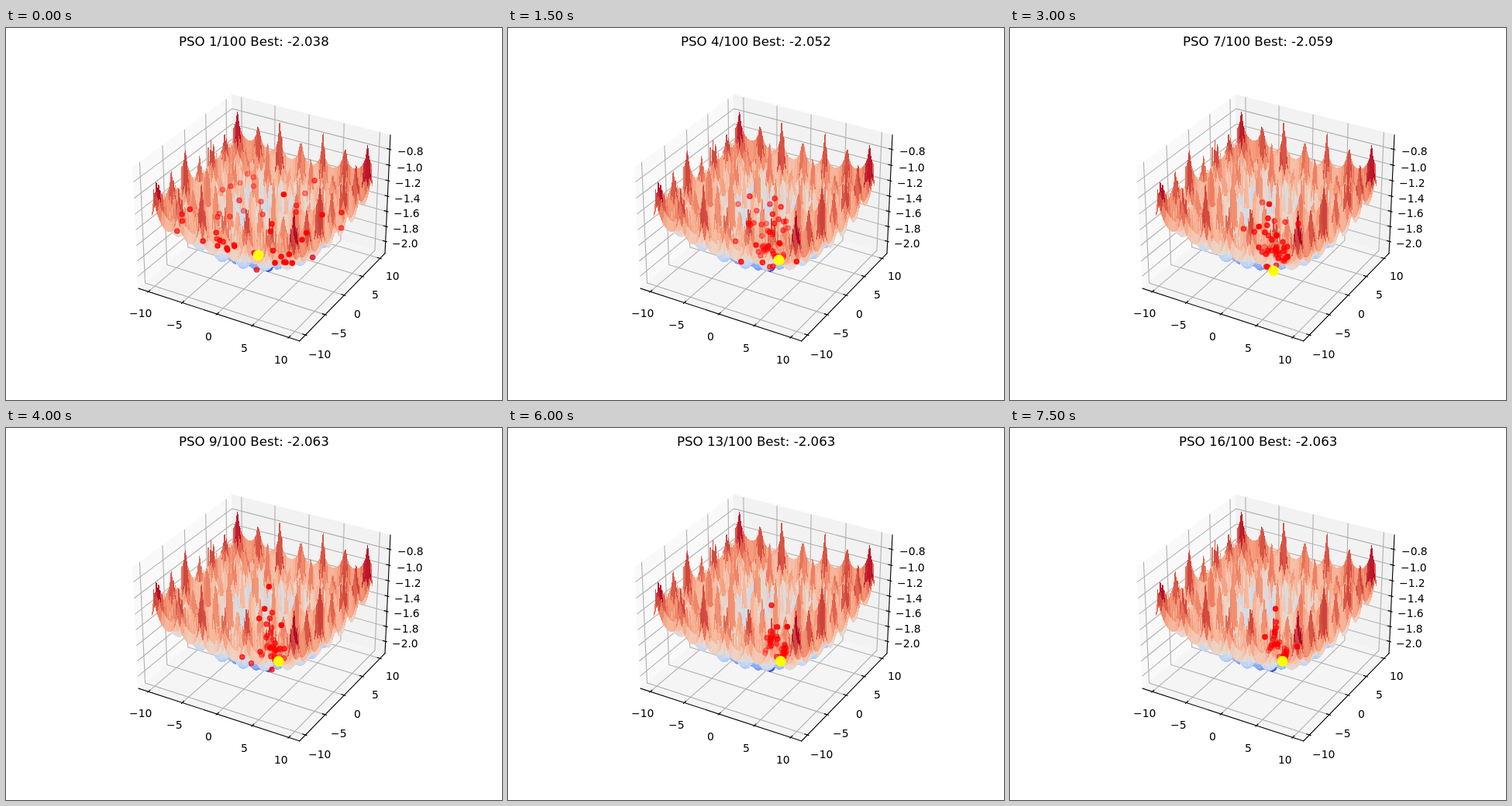
An HTML page for the animation above (8000 ms loop, 640 by 480 pixels).

```html
<!DOCTYPE html>
<html>
<head>
<meta charset="utf-8">
<style>
  html, body { margin: 0; width: 100%; height: 100%; overflow: hidden; background: #fff; }
  svg { display: block; width: 640px; height: 480px; }
  text { font: 13.89px "DejaVu Sans", sans-serif; }
  #title { font-size: 16.67px; }
  .grid { fill: none; stroke: #b0b0b0; stroke-width: 1.11; }
  .axis { fill: none; stroke: #000; stroke-width: 1.11; stroke-linecap: square; }
  #surface { shape-rendering: crispEdges; stroke-width: 1.1; stroke-linejoin: round; }
  #swarm { fill: red; stroke: red; stroke-width: 1.39; }
</style>
</head>
<body>
<svg viewBox="0 0 640 480">
  <g id="frame"></g>
  <g id="surface"></g>
  <g id="swarm"></g>
  <circle id="best" r="6.2" fill="#ff0" stroke="#ff0" stroke-width="1.39"/>
  <text id="title" y="23"></text>
</svg>
<script>
const $ = id => document.getElementById(id);

// Cross-in-tray function
const f = (x, y) => -1e-4 * (Math.abs(Math.sin(x) * Math.sin(y)
  * Math.exp(Math.abs(100 - Math.hypot(x, y) / Math.PI))) + 1) ** 0.1;

// Sampled heights and the axis limits that follow from them
const N = 100;
const at = i => -10 + 20 * i / (N - 1);
const heights = Array.from({ length: N }, (_, r) =>
  Array.from({ length: N }, (_, c) => f(at(c), at(r))));
const zMin = Math.min(...heights.flat()), zMax = Math.max(...heights.flat());
const zMid = (zMin + zMax) / 2, zSpan = (zMax - zMin) * 1.1;

// Perspective camera: elevation 30, azimuth -60, distance 10
const H = Math.sqrt(3) / 2;
function project(x, y, z) {
  const px = x * 8 / 7 / 22, py = y * 8 / 7 / 22, pz = (z - zMid) * 6 / 7 / zSpan;
  const depth = 10 - (px * H / 2 - py * 0.75 + pz / 2);
  const k = 1997.8 / depth;
  return [333 + k * (px * H + py / 2), 237.4 - k * (-px / 4 + py * H / 2 + pz * H), depth];
}
const points = list => list.map(p => {
  const [x, y] = project(...p);
  return x.toFixed(2) + ',' + y.toFixed(2);
}).join(' ');

// Centres a text but starts it on a whole pixel
function centre(el, x) {
  el.setAttribute('x', Math.round(x - el.getComputedTextLength() / 2));
}

function drawFrame() {
  const E = 11 * 25 / 24, Z0 = zMid - zSpan * 25 / 48, Z1 = zMid + zSpan * 25 / 48;
  const out = 22 / 120, inn = 22 / 60;
  const shift = 1.0375 / 12, pad = E + 22 * shift, zPad = Z0 - zSpan * shift;
  const line = (cls, ...p) => `<polyline class="${cls}" points="${points(p)}"/>`;
  const pane = (color, ...p) =>
    `<polygon fill="${color}" stroke="${color}" points="${points(p)}"/>`;
  const label = (value, ...p) => {
    const [x, y] = project(...p);
    return `<text x="${x}" y="${Math.round(y + 11)}">${String(value).replace('-', '\u2212')}</text>`;
  };
  let grid = '', ticks = '';
  for (let v = -10; v <= 10; v += 5) {
    grid += line('grid', [v, -E, Z0], [v, E, Z0], [v, E, Z1])
      + line('grid', [E, v, Z0], [-E, v, Z0], [-E, v, Z1]);
    ticks += line('axis', [v, -E - out, Z0], [v, -E + inn, Z0]) + label(v, v, -pad, zPad)
      + line('axis', [E + out, v, Z0], [E - inn, v, Z0]) + label(v, pad, v, zPad);
  }
  for (let i = 4; i <= 10; i++) {
    const z = -i / 5;
    grid += line('grid', [-E, -E, z], [-E, E, z], [E, E, z]);
    ticks += line('axis', [E + out, E, z], [E - inn, E, z]) + label(z.toFixed(1), pad, pad, z);
  }
  $('frame').innerHTML =
    pane('#f9f9f9', [-E, -E, Z0], [-E, E, Z0], [-E, E, Z1], [-E, -E, Z1])
    + pane('#f2f2f2', [-E, E, Z0], [E, E, Z0], [E, E, Z1], [-E, E, Z1])
    + pane('#f5f5f5', [-E, -E, Z0], [E, -E, Z0], [E, E, Z0], [-E, E, Z0])
    + grid
    + line('axis', [-E, -E, Z0], [E, -E, Z0]) + line('axis', [E, -E, Z0], [E, E, Z0])
    + line('axis', [E, E, Z0], [E, E, Z1])
    + ticks;
  for (const el of $('frame').querySelectorAll('text')) centre(el, +el.getAttribute('x'));
}

const ramp = ('3b4cc0 4d68d7 6282ea 779af7 8db0fe a3c2ff b8d0f9 ccd9ee dddddd '
  + 'ecd3c5 f5c4ad f7b194 f49a7b ec7f63 de604d cb3e38 b40426').split(' ')
  .map(h => [0, 2, 4].map(i => parseInt(h.slice(i, i + 2), 16)));
function heat(t) {
  const i = Math.min(15, Math.floor(t * 16)), u = t * 16 - i;
  return `rgb(${ramp[i].map((a, j) => Math.round(a + (ramp[i + 1][j] - a) * u))})`;
}

function drawSurface() {
  const mean = list => list.reduce((a, b) => a + b) / list.length;
  const cells = [];
  for (let r0 = 0; r0 < N - 1; r0 += 2) {
    for (let c0 = 0; c0 < N - 1; c0 += 2) {
      const r1 = Math.min(r0 + 2, N - 1), c1 = Math.min(c0 + 2, N - 1), ring = [];
      const add = (r, c) => ring.push([at(c), at(r), heights[r][c]]);
      for (let c = c0; c < c1; c++) add(r0, c);
      for (let r = r0; r < r1; r++) add(r, c1);
      for (let c = c1; c > c0; c--) add(r1, c);
      for (let r = r1; r > r0; r--) add(r, c0);
      cells.push({
        ring,
        z: mean(ring.map(p => p[2])),
        near: mean(ring.map(p => 1 / project(...p)[2]))
      });
    }
  }
  const zs = cells.map(c => c.z), low = Math.min(...zs), high = Math.max(...zs);
  cells.sort((a, b) => a.near - b.near);
  // The outline makes each cell fill every pixel it touches
  $('surface').innerHTML = cells.map(c => {
    const color = heat((c.z - low) / (high - low));
    return `<polygon fill="${color}" stroke="${color}" points="${points(c.ring)}"/>`;
  }).join('');
}

// Starting swarm as seen on screen, the far side of the bowl first
const FAR = 12;
const start = [
  290, 204.5, 279.5, 209, 275, 239.5, 273, 244, 289, 243.5, 302, 200, 312, 188,
  301, 222.5, 306.5, 236, 319, 192, 319.5, 204, 331, 241,
  329, 224, 357.5, 215, 386, 213, 398, 197, 374.5, 229, 374, 237.5, 433, 238,
  432.5, 258, 408, 241, 395.5, 296, 369, 303.5, 366, 292, 355, 295, 347, 303,
  359, 302, 323.5, 312, 344.5, 287, 382, 273, 387, 264.5, 341, 262, 320, 290.5,
  361, 302.5, 343, 252.5, 237, 234, 227, 240, 227.5, 249, 221, 262, 254, 275,
  271, 264, 272, 272, 273, 281, 276, 273.5, 280, 276, 286, 286, 285, 284,
  294, 280, 294.5, 282
];

// Best solution: first step, value, x, y
const bests = [
  [1, '-2.038', -1.36, 0.88], [3, '-2.052', 1.09, 1.37],
  [5, '-2.059', 1.55, -1.29], [8, '-2.063', 1.349, 1.349]
];
const bestAt = step => bests.filter(b => b[0] <= step).pop();

let seed = 7;
function random() {
  seed = (seed * 1664525 + 1013904223) % 4294967296;
  return seed / 4294967296;
}

// Places on the surface that appear at the starting screen points
function unprojectStart() {
  const cloud = [];
  for (let x = -10; x <= 10; x += 0.05) {
    for (let y = -10; y <= 10; y += 0.05) cloud.push([x, y, ...project(x, y, f(x, y))]);
  }
  const swarm = [];
  for (let i = 0; i < start.length; i += 2) {
    const bias = i / 2 < FAR ? -0.7 : 0.7;
    let least = Infinity, hit;
    for (const p of cloud) {
      const cost = Math.hypot(p[2] - start[i], p[3] - start[i + 1]) + bias * p[4];
      if (cost < least) { least = cost; hit = p; }
    }
    swarm.push({ pos: [hit[0], hit[1]], vel: [0, 0], own: [hit[0], hit[1]] });
  }
  return swarm;
}

const STEPS = 16;
function simulate() {
  const swarm = unprojectStart(), history = [];
  for (let step = 1; step <= STEPS; step++) {
    history.push(swarm.map(p => project(...p.pos, f(...p.pos))).sort((a, b) => b[2] - a[2]));
    const [, , bx, by] = bestAt(step), aim = [bx, by + 1];
    for (const p of swarm) {
      p.vel = p.vel.map((v, k) => 0.5 * v + 0.85 * random() * (p.own[k] - p.pos[k])
        + 0.6 * random() * (aim[k] - p.pos[k]));
      p.pos = p.pos.map((x, k) => Math.max(-10, Math.min(10, x + p.vel[k])));
      if (f(...p.pos) < f(...p.own)) p.own = [...p.pos];
    }
  }
  return history;
}

drawFrame();
drawSurface();
const history = simulate();

function show(step) {
  const dots = history[step - 1], far = dots[0][2], near = dots[dots.length - 1][2];
  $('swarm').innerHTML = dots.map(([x, y, d]) => {
    const a = (1 - 0.7 * (d - near) / (far - near)).toFixed(2);
    return `<circle cx="${x}" cy="${y}" r="3.1" fill-opacity="${a}" stroke-opacity="${a}"/>`;
  }).join('');
  const [, value, bx, by] = bestAt(step), [x, y] = project(bx, by, f(bx, by));
  $('best').setAttribute('cx', x);
  $('best').setAttribute('cy', y);
  $('title').textContent = `PSO ${step}/100 Best: ${value}`;
  centre($('title'), 320);
}

let shown = 1;
show(shown);
const t0 = performance.now();
function tick() {
  const step = 1 + Math.floor((performance.now() - t0) / 500) % STEPS;
  if (step !== shown) show(shown = step);
  requestAnimationFrame(tick);
}
requestAnimationFrame(tick);
</script>
</body>
</html>
```
